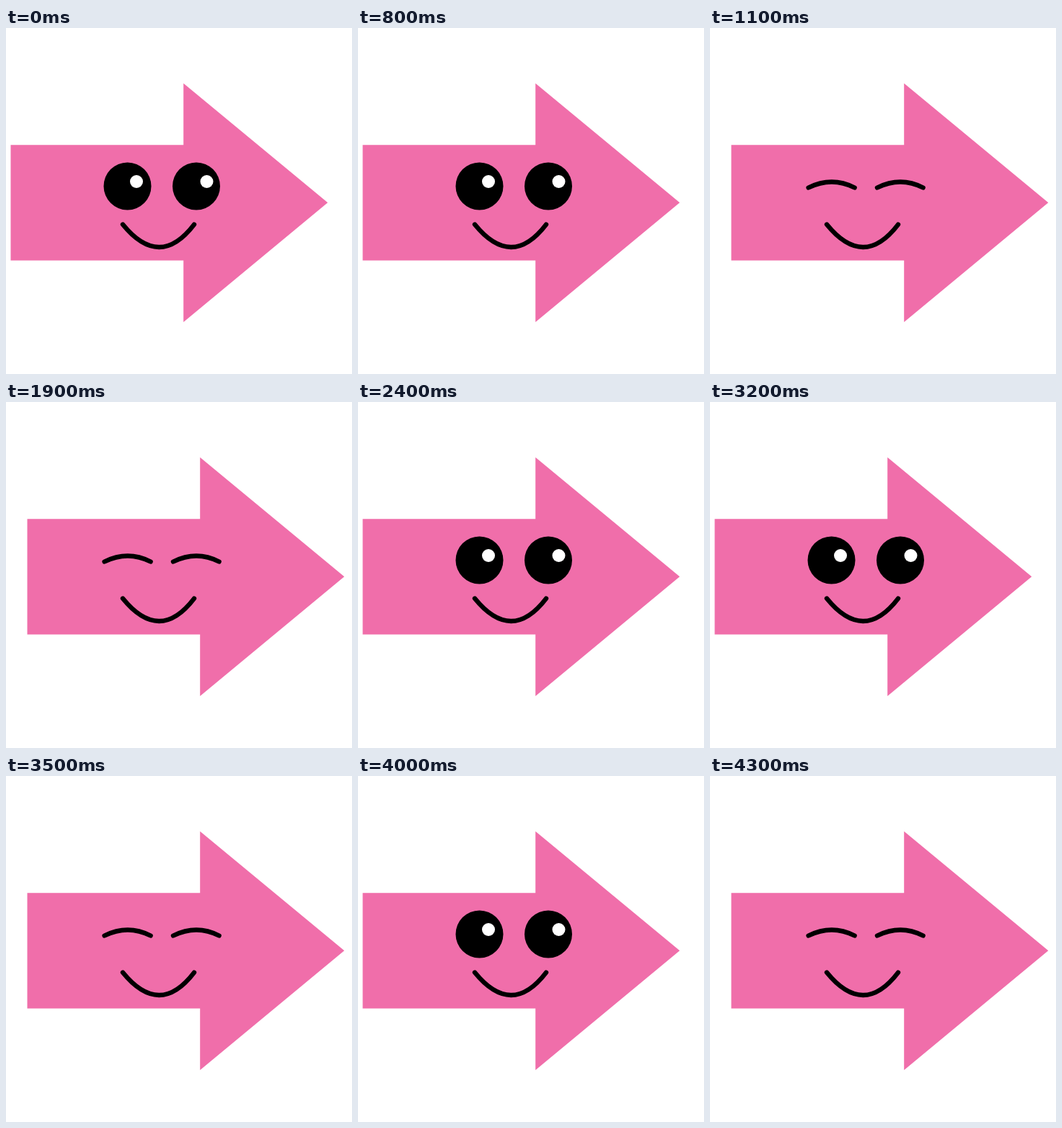
Animation, 480 px wide and 480 px high, one loop 4800 ms. Source, as an HTML page:

```html
<!DOCTYPE html>
<html lang="en">
<head>
<meta charset="utf-8">
<title>Blinking arrow</title>
<style>
  html, body { margin: 0; width: 100%; height: 100%; overflow: hidden; background: #fff; }
  svg { display: block; width: 100%; height: 100%; }
  .line { fill: none; stroke: #000; stroke-width: 6.4; stroke-linecap: round; }
</style>
</head>
<body>
<svg viewBox="0 0 480 480">
  <path id="arrow" fill="#f06eaa" d="M6.5 162.2H246.2V76.7L446.3 242.2L246.2 408V322.5H6.5Z"/>
  <path class="line" d="M162 272.6Q213 335.4 261 272.6"/>
  <g id="open">
    <circle cx="168.5" cy="219.4" r="33"/>
    <circle cx="264" cy="219.4" r="33"/>
    <g fill="#fff">
      <circle cx="181" cy="213" r="9"/>
      <circle cx="278.5" cy="213" r="9"/>
    </g>
  </g>
  <g id="closed" class="line">
    <path d="M136.6 221.5Q169 205.5 200.6 221.5"/>
    <path d="M232 221.5Q264.4 205.5 295.6 221.5"/>
  </g>
</svg>
<script>
  const PERIOD = 800, OPEN_TIME = 300, SHIFT = 23;
  const [arrow, open, closed] = ["arrow", "open", "closed"].map(id => document.getElementById(id));
  const show = (part, visible) => part.setAttribute("visibility", visible ? "visible" : "hidden");
  let start;

  function draw(now) {
    start ??= now;
    const isOpen = (now - start) % PERIOD < OPEN_TIME;
    show(open, isOpen);
    show(closed, !isOpen);
    arrow.setAttribute("transform", `translate(${isOpen ? 0 : SHIFT})`);
    requestAnimationFrame(draw);
  }
  requestAnimationFrame(draw);
</script>
</body>
</html>
```
